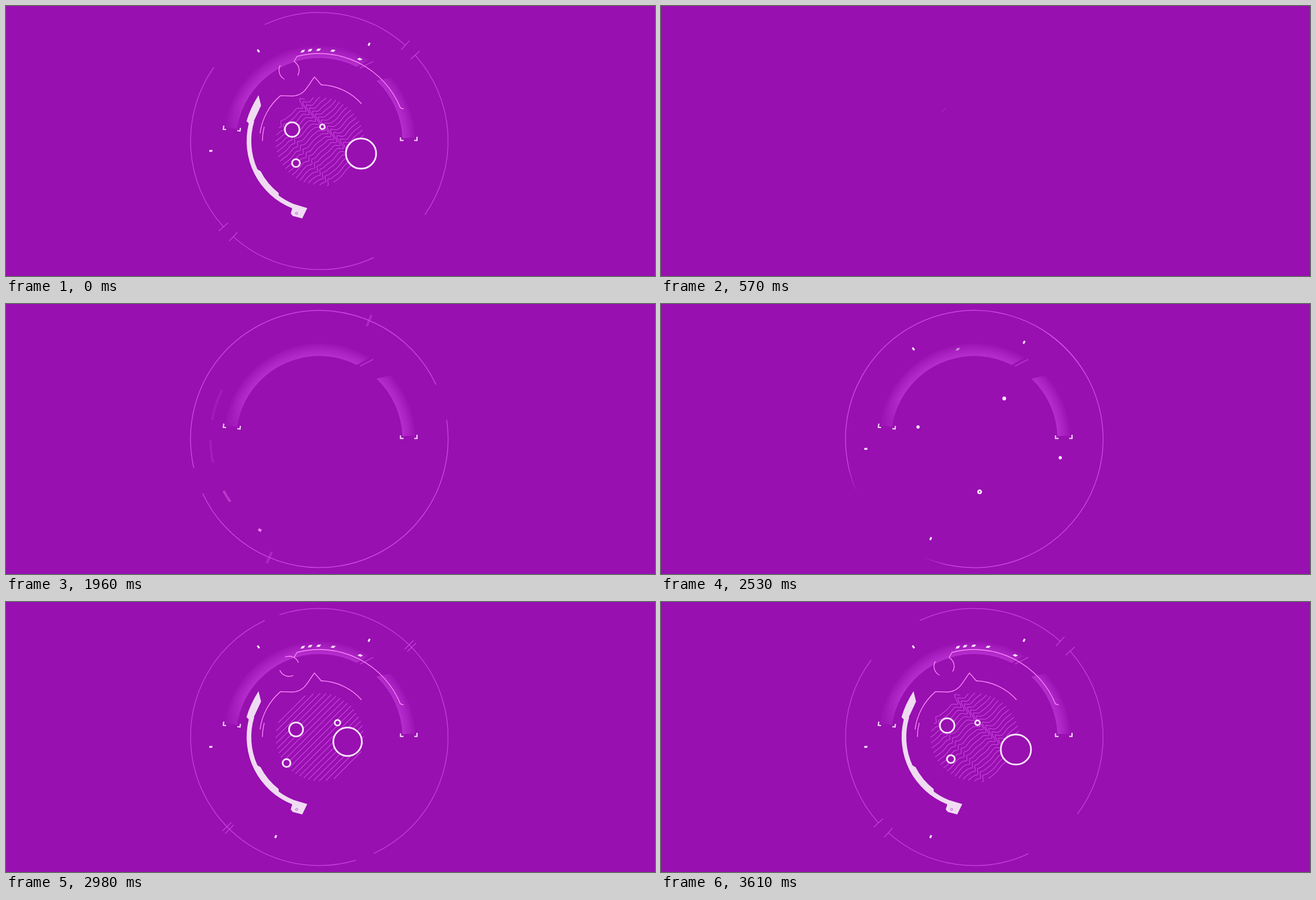
Animation, 1159 px wide and 483 px high, one loop 3.64 s. Source, as an HTML page with a canvas:

```html
<!DOCTYPE html>
<html lang="en">
<head>
<meta charset="utf-8">
<title>Radar dial</title>
<style>
html, body { margin: 0; width: 100%; height: 100%; overflow: hidden; background: #9810b0; }
canvas { display: block; }
</style>
</head>
<body>
<canvas id="stage" width="1159" height="483"></canvas>
<script>
const ctx = document.getElementById('stage').getContext('2d');
const LOOP = 3640, BG = '#9810b0', CX = 559.5, CY = 241.5, RING = 230;
const PINK = '#ff8cff', PALE = '#fbe6ff', LILAC = '#d24be6';
const rad = a => a * Math.PI / 180;
const clamp = (v, lo = 0, hi = 1) => Math.min(hi, Math.max(lo, v));
const smooth = p => p * p * (3 - 2 * p);
const ramp = (t, a, b) => clamp((t - a) / (b - a));
const polar = (r, a) => [CX + r * Math.cos(rad(a)), CY + r * Math.sin(rad(a))];

// Eased keyframes: key(t, time, value, time, value, ...)
function key(t, ...k) {
  if (t <= k[0]) return k[1];
  for (let i = 2; i < k.length; i += 2) {
    if (t <= k[i]) {
      return k[i - 1] + (k[i + 1] - k[i - 1]) * smooth(ramp(t, k[i - 2], k[i]));
    }
  }
  return k[k.length - 1];
}

function arc(r, a, b, x = CX, y = CY) {
  if (b <= a) return;
  ctx.beginPath();
  ctx.arc(x, y, r, rad(a), rad(b));
  ctx.stroke();
}

function poly(points, close) {
  ctx.beginPath();
  points.forEach(p => ctx.lineTo(p[0], p[1]));
  if (close) ctx.closePath();
}

function pen(color, width, alpha = 1) {
  ctx.strokeStyle = color;
  ctx.lineWidth = width;
  ctx.globalAlpha = alpha;
}

function ringArc(a, b, fade, alpha) {
  pen('#e05cf4', 1.5, alpha);
  arc(RING, a + fade, b - fade);
  if (fade < 0.5) return;
  const n = 8, step = fade / n;
  for (let i = 0; i < n; i++) {
    ctx.globalAlpha = alpha * (i + 0.5) / n;
    arc(RING, a + i * step, a + (i + 1) * step);
    arc(RING, b - (i + 1) * step, b - i * step);
  }
}

function drawRing(t) {
  if (t < 1475) {
    const half = 73.5 * (1 - (1 - ramp(t, 950, 1460)) ** 3);
    ringArc(-half, half, 0, 0.85);
    ringArc(180 - half, 180 + half, 0, 0.85);
    return;
  }
  const alpha = key(t, 2600, 0.72, 2980, 0.6);
  if (t < 3100) {
    const fade = key(t, 2030, 0, 2530, 13, 2600, 13, 2800, 0);
    const a0 = key(t, 1475, -73.5, 1960, -8.5, 2030, -8.5, 2530, -66, 2600, -66, 2980, -108, 3100, -115);
    const a1 = key(t, 1475, 73.5, 1960, 155, 2030, 155, 2530, 114, 2600, 114, 2950, 65);
    const b0 = key(t, 1475, 106.5, 1960, 167, 2030, 167, 2530, 155, 2600, 155, 2980, 73.5, 3100, 65);
    const b1 = key(t, 1475, 253.5, 1960, 335, 2600, 335, 2950, 245);
    ringArc(a0, a1, fade, alpha);
    ringArc(b0, b1, fade, alpha);
    return;
  }
  const gap = tickGap(t);
  const end = t < 3640 ? 65 - 30 * ramp(t, 3150, 3640) : 35 - 77 * ramp(t, 3640, 4000) ** 1.3;
  const tail = t < 3800 ? -45 - gap : -48 - 67 * smooth(ramp(t, 3800, 4190));
  for (const turn of [0, 180]) {
    ringArc(turn - 115, turn + tail, 0, alpha);
    ringArc(turn - 45 + gap, turn + end, 0, alpha);
  }
}

const tickGap = t => key(t, 2900, 0.5, 2980, 0.8, 3450, 3.1);

function drawTicks(t) {
  const line = (a, r0, r1) => {
    poly([polar(r0, a), polar(r1, a)]);
    ctx.stroke();
  };
  for (const turn of [0, 180]) {
    if (t > 1780 && t < 2150) {
      pen(LILAC, 4, 0.4 * ramp(t, 1780, 1960) * (1 - ramp(t, 2030, 2150)));
      line(turn + key(t, 1780, -82, 1960, -67.2, 2150, -55), 219, 241);
    }
    if (t > 2800) {
      const len = 11 * ramp(t, 2800, 2950) * (1 - ramp(t, 3850, 4050));
      pen('#e05cf4', 1.4, 0.65);
      for (const side of [-1, 1]) {
        line(turn - 45 + side * tickGap(t), RING - len, RING + len);
      }
    }
  }
}

function drawBand(t) {
  const show = smooth(ramp(t, 1500, 1860));
  if (!show) return;
  const fade = 1 - smooth(ramp(t, 3760, 4170));
  const g = ctx.createRadialGradient(CX, CY, 148, CX, CY, 171);
  g.addColorStop(0, '#b62fce');
  g.addColorStop(0.5, '#aa22c2');
  g.addColorStop(1, '#9b13b3');
  ctx.save();
  ctx.globalAlpha = fade;
  ctx.beginPath();
  ctx.moveTo(CX, CY);
  ctx.arc(CX, CY, 180, rad(186), rad(188 + 172 * show));
  ctx.clip();
  ctx.fillStyle = g;
  const piece = (outA, outB, inB, inA) => {
    ctx.beginPath();
    ctx.arc(CX, CY, 171, rad(outA), rad(outB));
    ctx.arc(CX, CY, 148.5, rad(inB), rad(inA), true);
    ctx.fill();
  };
  piece(188.3, 301.7, 296.8, 188.3);
  piece(318.3, 358, 358, 313.4);
  pen('#b62fce', 2);
  poly([[632, 111], [656, 99]]);
  ctx.stroke();
  const tip = ctx.createLinearGradient(0, 219, 0, 170);
  tip.addColorStop(0, 'rgba(152,16,176,.55)');
  tip.addColorStop(1, 'rgba(152,16,176,0)');
  ctx.fillStyle = tip;
  ctx.fillRect(385, 165, 50, 56);
  ctx.restore();

  pen(PALE, 2);
  if (t > 1600 && t < 3960) {
    poly([[389, 214], [388, 220.5], [393, 221]]); ctx.stroke();
    poly([[413, 223], [418, 223.7], [418.6, 218]]); ctx.stroke();
  }
  if (t > 1800 && t < 4020) {
    poly([[704.5, 235], [704.5, 240.5], [710, 240.5]]); ctx.stroke();
    poly([[729, 240.5], [734, 240.5], [734, 234]]); ctx.stroke();
  }
}

function drawDashes(t) {
  for (let i = 0; i < 4; i++) {
    if (t >= 3640 + i * 110) continue;
    const len = clamp(1.8 + 5.1 * i - (t - 1960) * 0.073, 0.95, 40);
    if (len > 21) continue;
    const mid = key(t, 1600, 100, 1960, 123.1 + 25.1 * i, 2030, 123.1 + 25.1 * i, 2480, 113.6 + 61.2 * i);
    pen(t < 2150 ? PINK : PALE, key(t, 2030, 4.5, 2400, 5.5), Math.max(0.09, Math.exp((0.95 - len) / 5)));
    arc(194.5, mid - len / 2, mid + len / 2);
  }
}

function drawDiamonds(t) {
  if (t < 2500) return;
  const out = smooth(ramp(t, 2600, 2930)) * (1 - ramp(t, 3625, 4100) ** 1.4);
  [0, 4.6, 10, 19.1, 37].forEach((a, i) => {
    if (t > 4090 || (i && out < 0.03)) return;
    const angle = -100.4 + a * out;
    ctx.save();
    ctx.globalAlpha = ramp(t, 2480, 2580);
    ctx.translate(...polar(163.3, angle));
    ctx.rotate(rad(angle + 90));
    poly([[-4.5, 2], [-1.5, -2], [4.5, -2], [1.5, 2]], true);
    ctx.fillStyle = PALE;
    ctx.fill();
    ctx.restore();
  });
}

function drawOutlines(t) {
  const p = smooth(ramp(t, 2620, 2930)) * (1 - smooth(ramp(t, 3690, 4120)));
  if (!p) return;
  const trace = (length, build) => {
    ctx.beginPath();
    build();
    ctx.setLineDash([length * p, length * 2]);
    ctx.stroke();
  };
  pen(PINK, 1.4);
  trace(242, () => {
    ctx.moveTo(514.5, 99);
    ctx.lineTo(519.5, 90.5);
    ctx.arc(CX, CY, 156.5, rad(-104.5), rad(-22.2));
    ctx.lineTo(710, 184);
  });
  trace(268, () => {
    ctx.arc(CX, CY, 106.7, rad(187.3), rad(229.5));
    ctx.lineTo(512, 161);
    ctx.bezierCurveTo(534, 160, 538, 143, 551, 127);
    ctx.lineTo(563, 141);
    ctx.arc(CX, CY, 100.6, rad(-88), rad(-41.4));
  });
  trace(27, () => ctx.arc(CX, CY, 101.6, rad(180), rad(194.5)));
  ctx.setLineDash([]);
  const spin = key(t, 2650, -50, 2980, 0, 3100, 6, 3170, 6, 3560, 52.5, 3640, 52.5, 4100, 100);
  const half = 46 * p;
  arc(18, spin - 67 - half, spin - 67 + half, 505.5, 115);
  arc(18, spin + 111 - half, spin + 111 + half, 505.5, 115);
}

function drawBlade(t) {
  const p = smooth(ramp(t, 2610, 2920)) * (1 - smooth(ramp(t, 3670, 4090)));
  if (!p) return;
  ctx.save();
  ctx.beginPath();
  ctx.moveTo(CX, CY);
  ctx.arc(CX, CY, 170, rad(226 - 132 * p), rad(226));
  ctx.clip();
  ctx.beginPath();
  ctx.moveTo(451, 159.5);
  ctx.lineTo(455.5, 178);
  ctx.lineTo(442.5, 206);
  ctx.arc(CX, CY, 121.5, rad(197), rad(155.5), true);
  ctx.lineTo(453.5, 295);
  ctx.arc(CX, CY, 118, rad(153), rad(128), true);
  ctx.lineTo(487, 337);
  ctx.arc(CX, CY, 121.5, rad(126.5), rad(112), true);
  ctx.lineTo(538, 361.5);
  ctx.lineTo(529, 380);
  ctx.lineTo(512, 375.5);
  ctx.lineTo(508.5, 371);
  ctx.lineTo(511, 363);
  ctx.arc(CX, CY, 129.8, rad(112), rad(194));
  ctx.lineTo(429.5, 206);
  ctx.quadraticCurveTo(436, 183, 451, 159.5);
  ctx.fillStyle = '#fff';
  ctx.fill();
  pen('#c44bdc', 1);
  arc(2, 0, 360, 519, 371);
  ctx.restore();
}

function drawHatch(t) {
  const grow = smooth(ramp(t, 2600, 2930)), wipe = smooth(ramp(t, 3680, 4180));
  if (!grow || wipe === 1) return;
  const strong = key(t, 2950, 0, 3500, 8, 3640, 8.5, 4100, 4);
  const weak = strong * 0.4;
  const kink = x => -2.3 * x * Math.exp(-x * x);
  const q = Math.SQRT1_2, size = 78.8;
  pen(LILAC, 1.3, 0.85);
  for (let i = 1; i < 20; i++) {
    const v = -78.5 + i * 7.85, h = Math.sqrt(size * size - v * v);
    const from = -h + 2 * h * wipe, to = -h + 2 * h * grow;
    ctx.beginPath();
    for (let u = from; u <= to; u += 1.5) {
      const bend = strong * kink((u - 24) / 6) + weak * kink((u + 35 + v / 9) / 5)
        + strong * 0.1 * Math.sin(u / 6 + v / 15);
      const w = v + bend;
      ctx.lineTo(560.5 + (u + w) * q, 241.5 + (w - u) * q);
    }
    ctx.stroke();
  }
}

// x, y and radius at the start, the crossing and the rest pose, then the exit time
const bubbles = [
  [459, 220, 1.4, 518, 228, 12.5, 511, 221, 13, 3880],
  [713, 275, 1.4, 610, 250, 25.5, 634, 264, 27, 3980],
  [613, 169, 1.9, 592, 216, 5, 565, 216, 4.2, 4080],
  [569, 336, 2.8, 501, 288, 7, 517.8, 281, 7, 4210]
];

function drawBubbles(t) {
  if (t < 2430) return;
  for (const b of bubbles) {
    if (t >= b[9]) continue;
    const [x, y, r] = [0, 1, 2].map(i => key(t, 2600, b[i], 2980, b[i + 3], 3100, b[i + 3], 3640, b[i + 6]));
    ctx.globalAlpha = 1;
    ctx.fillStyle = BG;
    ctx.beginPath();
    ctx.arc(x, y, r, 0, 7);
    ctx.fill();
    pen(PALE, 3, ramp(t, 2430, 2510));
    ctx.stroke();
  }
}

function draw(now) {
  const clock = now % LOOP;
  const t = clock < 570 ? clock + LOOP : clock;
  ctx.globalAlpha = 1;
  ctx.fillStyle = BG;
  ctx.fillRect(0, 0, 1159, 483);
  if (t >= 950) {
    drawRing(t);
    drawTicks(t);
    drawBand(t);
    drawDashes(t);
    drawDiamonds(t);
    drawOutlines(t);
    drawHatch(t);
    drawBlade(t);
    drawBubbles(t);
  }
  if (clock >= 500 && clock < 950) {
    pen(LILAC, 1, 0.6);
    poly([[501, 190], [509, 182]]);
    ctx.stroke();
  }
}

const begin = performance.now();
function tick() {
  draw(performance.now() - begin);
  requestAnimationFrame(tick);
}
tick();
</script>
</body>
</html>
```
